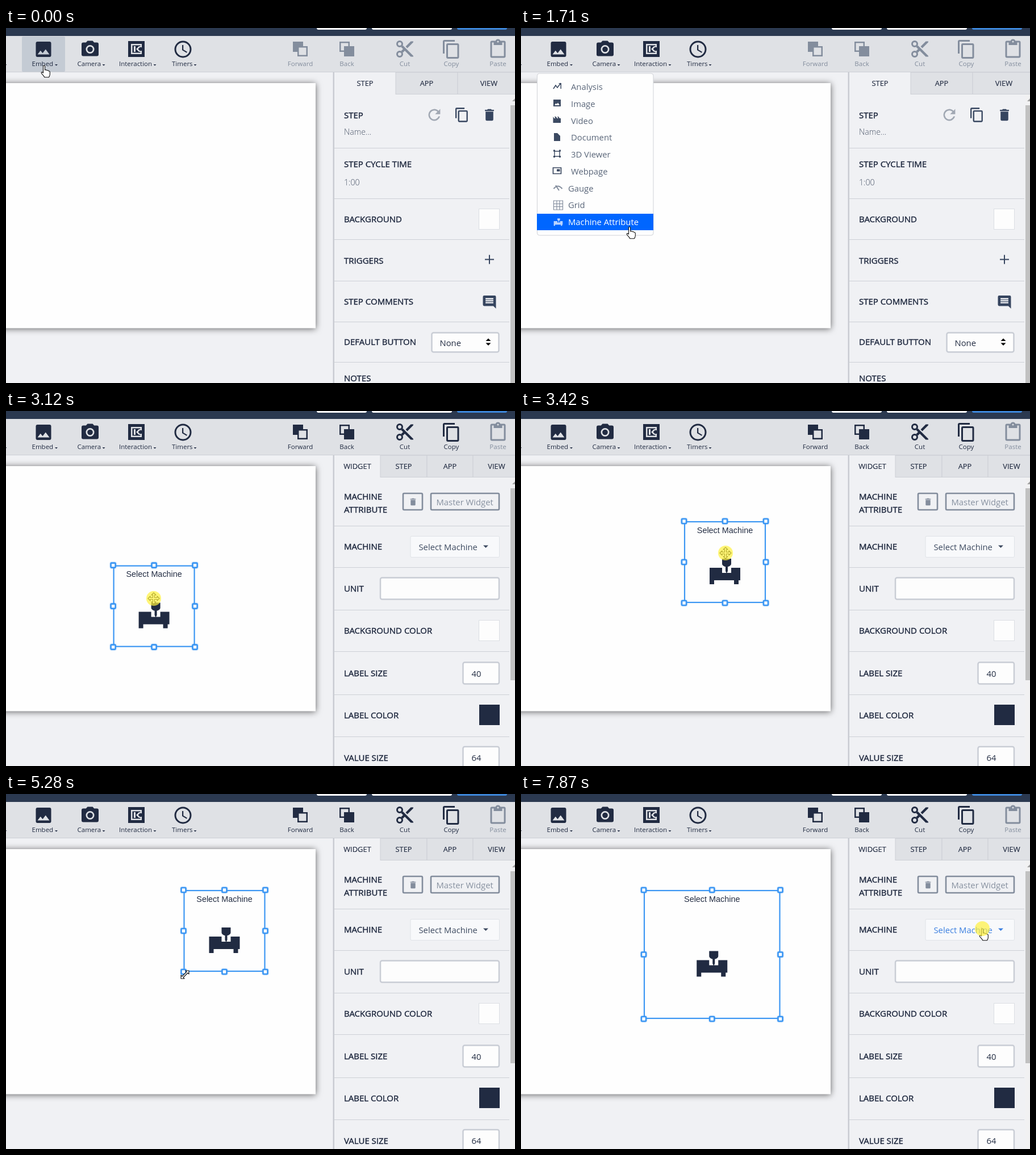
An HTML page that plays this animation: 896 by 625 pixels, repeating every 8000 ms.

```html
<!DOCTYPE html>
<html lang="en">
<head>
<meta charset="utf-8">
<title>App editor</title>
<style>
html, body { margin: 0; width: 100%; height: 100%; overflow: hidden; background: #f0f1f4; }
svg { display: block; font: 14.8px "Open Sans", "Noto Sans", sans-serif; }
text { fill: #232d43; white-space: pre; }
.title { font-size: 15px; fill: #1d273d; stroke: #1d273d; stroke-width: .4; }
.tab { font-size: 12.9px; text-anchor: middle; stroke: #232d43; stroke-width: .15; }
.tool { font-size: 11.5px; }
.mid { text-anchor: middle; }
.thin { font-weight: 300; font-size: 14.2px; fill: #4a5568; }
.soft { fill: #8791a0; }
.menu text { fill: #5b677a; }
.arial { font: 14.4px "Liberation Sans", Arial, sans-serif; text-anchor: middle; }
.field { fill: #fdfdfd; stroke: #c9cdd5; stroke-width: 2.5; }
.line { fill: none; stroke: currentColor; stroke-width: 3; }
.icon { fill: currentColor; color: #212b42; }
.icon text { fill: currentColor; }
.off { color: #838d9d; }
.cursor { fill: #fff; stroke: #111; stroke-width: 1.1; stroke-linejoin: round; }
</style>
</head>
<body>
<script>
const W = 896, H = 625, LOOP = 8000, TICK = 77.7;
const TOOLBAR = '#dfe1e5', NAVY = '#212b42', BLUE = '#3b96f3', RULE = '#cdd0d6';

const rect = (x, y, w, h, fill, more = '') =>
  `<rect x="${x}" y="${y}" width="${w}" height="${h}" fill="${fill}" ${more}/>`;
const box = (x, y, w, h) => `<rect class="field" x="${x}" y="${y}" width="${w}" height="${h}" rx="3"/>`;
const text = (x, y, s, cls = '') => `<text x="${x}" y="${y}" class="${cls}">${s}</text>`;
const path = (d, more = '') => `<path d="${d}" ${more}/>`;
const line = (d, width = 3) => path(d, `class="line" style="stroke-width:${width}"`);
const group = (id, body, more = '') => `<g id="${id}" ${more}>${body}</g>`;
const caret = (x, y, r = 2.5) => path(`M${x - r} ${y}h${2 * r}l${-r} ${r}z`);
const titles = list => list.map(([y, s]) => text(595, y + 5, s, 'title')).join('');
const rules = ys => ys.map(y => rect(578, y, 308, 1, RULE)).join('');
const swatch = (y, fill) => rect(832.5, y, 36, 36, fill, 'stroke="#dcdfe4"');

// Icons on a 24 by 24 grid.
const glyphs = {
  photo: path('M5 3h14q2 0 2 2v14q0 2-2 2h-14q-2 0-2-2v-14q0-2 2-2zM5 18h14l-4.500-6-3.500 4.500-2.500-3z', 'fill-rule="evenodd"'),
  camera: path('M9 2h6l1.830 2h3.170q2 0 2 2v12q0 2-2 2h-16q-2 0-2-2v-12q0-2 2-2h3.170zM12 7a5 5 0 1 0 0 10a5 5 0 1 0 0-10z', 'fill-rule="evenodd"')
    + '<circle cx="12" cy="12" r="3.200"/>',
  clock: '<circle cx="12" cy="12" r="9" class="line" style="stroke-width:2"/>' + path('M11 7h1.500v5.250l4.500 2.670-.75 1.230-5.250-3.150z'),
  cut: '<g class="line" style="stroke-width:2"><circle cx="6" cy="6" r="3"/><circle cx="6" cy="18" r="3"/></g>'
    + path('M9.640 7.640L22 20v1h-3l-7-7-2.360 2.360-2-2L10 12 7.640 9.640zM19 3l-6 6 2 2 7-7v-1z'),
  copy: path('M16 1h-12q-2 0-2 2v14h2v-14h12zM8 5h11q2 0 2 2v14q0 2-2 2h-11q-2 0-2-2v-14q0-2 2-2zM8 7v14h11v-14z', 'fill-rule="evenodd"'),
  paste: path('M9.180 2a3 3 0 0 1 5.640 0h4.180q2 0 2 2v16q0 2-2 2h-14q-2 0-2-2v-16q0-2 2-2zM5 4v16h14v-16h-2v3h-10v-3zM12 2a1 1 0 1 0 0 2a1 1 0 1 0 0-2z', 'fill-rule="evenodd"'),
  refresh: path('M17.650 6.350A8 8 0 1 0 19.730 14h-2.080A6 6 0 1 1 16.220 7.780L13 11h7v-7z'),
  trash: path('M6 7h12v12q0 2-2 2h-8q-2 0-2-2zM5 4h3.500l1-1h5l1 1h3.500v2h-14z'),
  comment: path('M4 2h16q2 0 2 2v18l-4-4h-14q-2 0-2-2v-12q0-2 2-2zM6 6v2h12v-2zM6 9v2h12v-2zM6 12v2h12v-2z', 'fill-rule="evenodd"'),
};
const glyph = (name, x, y, k = 1.5) =>
  `<g transform="translate(${x} ${y}) scale(${k}) translate(-12 -12)">${glyphs[name]}</g>`;

// Each tab is its left edge and its name; the first one is active.
const tabs = list => list.map(([x, name], i) => {
  const end = i + 1 < list.length ? list[i + 1][0] : 905;
  const back = i ? rect(x, 78, end - x, 38.5, TOOLBAR, `stroke="${RULE}"`) : '';
  return back + text((x + end) / 2, 101.5, name, 'tab');
}).join('');

const toolbar = () => rect(0, 0, W, 14, '#2b3950')
  + rect(547, -6, 88, 9, '#fdfdfd', 'rx="3"') + rect(644, -6, 141, 9, '#fdfdfd', 'rx="3"')
  + rect(794, -6, 88, 9, '#3d86d8', 'rx="3"')
  + rect(0, 14, W, 63, TOOLBAR) + rect(0, 77, W, 1, RULE)
  + group('embedHover', rect(28, 15, 76, 62, '#c4cbd4', 'rx="2"'))
  + `<g class="icon">${
    glyph('photo', 66, 37.5) + glyph('camera', 148, 37.5) + glyph('clock', 311.5, 37.5)
  + rect(215, 23, 29, 28, NAVY)
  + path('M220 28h19v6h-2.500v-3.500h-14v13h14v-3.500h2.500v6h-19zM225 32h3v10h-3zM229 37l5-5h3.500l-5 5 5 5h-3.500z', `fill="${TOOLBAR}"`)
  + [[45.5, 'Embed', 88.5], [125.5, 'Camera', 172], [199, 'Interaction', 262], [292, 'Timers', 333]]
      .map(([x, s, c]) => text(x, 67, s, 'tool') + caret(c, 64)).join('') + caret(-1, 64)
  }</g>`
  + group('edit',
      rect(505, 24, 18, 18, 'currentColor') + rect(514.25, 33.25, 15.5, 15.5, TOOLBAR, 'stroke="currentColor" stroke-width="2.500"')
    + rect(588.25, 25.25, 15.5, 15.5, TOOLBAR, 'stroke="currentColor" stroke-width="2.500"') + rect(595, 32, 18, 18, 'currentColor')
    + glyph('cut', 702, 37) + glyph('copy', 784, 37.5)
    + [[518, 'Forward'], [600, 'Back'], [702, 'Cut'], [784, 'Copy']]
        .map(([x, s]) => text(x, 67, s, 'tool mid')).join(''), 'class="icon"')
  + `<g class="icon off">${glyph('paste', 866, 37.5)}${text(866, 67, 'Paste', 'tool mid')}</g>`;

const stepPanel = () => tabs([[578, 'STEP'], [686, 'APP'], [795, 'VIEW']])
  + rules([211, 300, 372, 445, 517, 588])
  + titles([[153.5, 'STEP'], [240, 'STEP CYCLE TIME'], [337, 'BACKGROUND'], [410, 'TRIGGERS'],
      [482, 'STEP COMMENTS'], [553, 'DEFAULT BUTTON'], [616.5, 'NOTES']])
  + text(595, 188, 'Name...', 'thin') + text(595, 277, '1:00', 'thin')
  + `<g class="icon" style="color:#a1a8b3">${glyph('refresh', 754, 153, 1.3)}</g>`
  + `<g class="icon" style="color:#36455f">${glyph('copy', 802.5, 153, 1.15)}${glyph('trash', 851, 153, 1.13)}`
  + line('M843 407.500h16M851 399.500v16', 2) + glyph('comment', 851, 482.5, 1.15) + '</g>'
  + swatch(318.5, '#fdfdfd') + box(749.5, 536.5, 118, 34) + text(763.5, 559.5, 'None')
  + path('M844.500 551l4.500-4.500 4.500 4.500zM844.500 554.500l4.500 4.500 4.500-4.500z');

const widgetPanel = () => tabs([[578, 'WIDGET'], [659, 'STEP'], [741, 'APP'], [822, 'VIEW']])
  + rules([202, 275, 350, 423, 499, 573])
  + titles([[151, 'MACHINE'], [174, 'ATTRIBUTE'], [238.5, 'MACHINE'], [313, 'UNIT'], [386.5, 'BACKGROUND COLOR'],
      [461.5, 'LABEL SIZE'], [536, 'LABEL COLOR'], [610.5, 'VALUE SIZE']])
  + `<g class="icon off">${[[699, 34], [748, 120]].map(([x, w]) =>
      rect(x, 145, w, 29, 'none', 'rx="2" stroke="currentColor" stroke-width="2.600"')).join('')}`
  + glyph('trash', 716.5, 160, .7) + '</g>' + text(757.5, 165.5, 'Master Widget', 'soft')
  + rect(712, 220.5, 156.5, 37, '#f8f9fb', 'rx="2" stroke="#dfe2e7"')
  + group('select', text(726.5, 244.5, 'Select Machine') + caret(844.5, 236.5, 4.5))
  + box(659, 293.5, 209, 38) + swatch(368.5, '#fdfdfd')
  + box(804.5, 442.5, 63.5, 38) + text(819.5, 468, '40')
  + rect(833, 517, 36, 36, NAVY) + box(804.5, 591, 63.5, 45) + text(819.5, 616, '64');

const menuIcons = [
  line('M57 107l4-6 3 4 6-8', 1.6) + path('M66 97h5v10h-1.500v-7z'),
  path('M57 126h13v12h-13zM59 136h9l-3-4.500-2 2.500-1.500-1.500z', 'fill-rule="evenodd"'),
  path('M56.500 156l2 3h2l-1.500-3h2.500l2 3h2l-1.500-3h2l2 3h2v8h-13.500z'),
  path('M58 185h6l5 5v9h-11z'),
  line('M59 217v9h9v-9z', 1.4) + path('M57 214.500h3v3h-3zM67 214.500h3v3h-3zM57 225h3v3h-3zM67 225h3v3h-3z'),
  line('M56.500 246h14v10.500h-14z', 1.7) + path('M63 248.500h5.500v4h-5.500z'),
  line('M57.500 283q7.500-9 15 0M61 277l6 9', 2),
  line('M57.500 304h16v16h-16zM63 304v16M68 304v16M57.500 309.500h16M57.500 314.500h16', 1.2),
];
const menuNames = ['Analysis', 'Image', 'Video', 'Document', '3D Viewer', 'Webpage', 'Gauge', 'Grid', 'Machine Attribute'];
const machine = 'M-27 10h22v9h16v-9h16v22h-3v7h-8v-7h-35v7h-8v-7zM-5-6h16v9q0 3-5 5h-1v8l-2 4-2-4v-8h-1q-5-2-5-5z';

const menu = () => rect(28.5, 80, 204.500, 285, '#fefefe', 'rx="4" stroke="#cfd2d7"')
  + group('choice', rect(28, 327, 205, 29, '#06f'))
  + menuNames.map((name, i) => text(i < 6 ? 88 : 83, 109.3 + i * 29.7, name, i === 8 ? 'last' : '')).join('')
  + `<g class="icon" style="color:#3c4a62">${menuIcons.slice(0, 6).join('')}</g>`
  + `<g class="icon off">${menuIcons.slice(6).join('')}</g>`
  + path(machine, 'id="menuMachine" transform="translate(65.500 337) scale(.29)"');

const cursors = {
  arrow: 'M0 0v14.500l3.400-3.200 2.300 5.200 2.600-1.100-2.300-5h4.700z',
  hand: 'M-1.500 1q1.500-2 3 0v7q3-1 3.500.8 2.500-.8 3 1 2.500-.3 2.300 2.500v3.500q-.3 3-2 5h-7.500q-1-2.500-5-6.500-1.500-2.500.500-2.800l2.200 1.500z',
  move: 'M0-10l4 4h-2.500v4.500h4.500v-2.500l4 4-4 4v-2.500h-4.500v4.500h2.500l-4 4-4-4h2.500v-4.500h-4.500v2.500l-4-4 4-4v2.500h4.500v-4.500h-2.500z',
  resize: 'M7-7v6l-2-2-8 8 2 2h-6v-6l2 2 8-8-2-2z',
};

document.body.innerHTML = `<svg width="${W}" height="${H}" viewBox="0 0 ${W} ${H}">`
  + rect(-20, 97, 565, 431.5, '#fefefe', 'style="filter:drop-shadow(0 1px 6px #0009)"')
  + toolbar()
  + rect(575.5, 78, 2.5, 547, '#c9ccd2')
  + group('stepPanel', stepPanel()) + group('widgetPanel', widgetPanel())
  + rect(888, 117, 8, 508, '#f1f1f2') + path('M891 129l5-5v5z', 'fill="#a0a0a0"')
  + rect(888, 136, 8, 489, '#c1c1c1', 'id="thumb"')
  + group('menu', menu(), 'class="menu"') + group('widget', '')
  + group('cursor', Object.entries(cursors).map(([id, d]) => path(d, `id="${id}" class="cursor"`)).join('')
    + '<circle id="press" r="13" fill="#fff13d" opacity=".7"/>')
  + '</svg>';

const $ = id => document.getElementById(id);
const show = (id, on) => { $(id).style.display = on ? '' : 'none'; };
const within = (k, ...spans) => spans.some(([a, b]) => k >= a && k < b);

// Keys are [tick, x, y], joined by straight lines.
const pointer = [[5, 67, 66], [10, 150, 250], [13, 205, 366], [15, 191, 350], [29, 191, 350], [31, 235, 350],
  [37, 235, 350], [42, 360, 250], [46, 384, 229], [56, 384, 229], [60, 480, 275], [63, 430, 312], [66, 315, 318],
  [69, 315, 318], [72, 255, 369], [75, 218, 401], [88, 218, 401], [91, 889, 270], [92, 852, 239], [93, 852, 239], [97, 812, 237]];
const drag = [[37, 164, 291], [42, 287, 194], [46, 312.5, 169]];

function at(keys, k) {
  const i = keys.findIndex(key => key[0] > k);
  if (i < 1) return (i ? keys[keys.length - 1] : keys[0]).slice(1);
  const [a, b] = [keys[i - 1], keys[i]], p = (k - a[0]) / (b[0] - a[0]);
  return [1, 2].map(n => a[n] + (b[n] - a[n]) * p);
}

function widget(x, y, r, b) {
  const cx = (x + r) / 2, cy = (y + b) / 2;
  const handles = [x, cx, r].flatMap(hx => [y, cy, b].map(hy => [hx, hy]))
    .filter(([hx, hy]) => hx !== cx || hy !== cy);
  return rect(x + 1, y + 1, r - x - 2, b - y - 2, '#fefefe', `stroke="${BLUE}" stroke-width="2.200"`)
    + text(cx, y + 20.5, 'Select Machine', 'arial')
    + path(machine, `fill="${NAVY}" transform="translate(${cx} ${cy})"`)
    + handles.map(([hx, hy]) => rect(hx - 4, hy - 4, 8, 8, '#fff',
        `rx="1" stroke="${BLUE}" stroke-width="2.600" style="filter:drop-shadow(0 0 1px #3b96f399)"`)).join('');
}

let shown;
function draw(now) {
  requestAnimationFrame(draw);
  const k = Math.floor((now % LOOP - 150) / TICK);
  if (k === shown) return;
  shown = k;

  const placed = k >= 23, chosen = k >= 17;
  show('embedHover', !chosen);
  show('menu', within(k, [3, 23]));
  show('choice', chosen);
  document.querySelector('.last').style.fill = chosen ? '#fff' : '';
  $('menuMachine').style.fill = chosen ? '#b9d4ff' : '#838d9d';
  show('stepPanel', !placed);
  show('widgetPanel', placed);
  show('widget', placed);
  $('edit').setAttribute('class', placed ? 'icon' : 'icon off');
  $('thumb').setAttribute('height', placed ? 338 : 489);

  const [x, y] = at(pointer, k);
  $('thumb').style.fill = x > 886 ? '#a8a8a8' : '';
  for (const node of $('select').children) node.style.fill = k >= 94 ? '#3b7fe0' : '#3d4a60';

  const [left, top] = at(drag, k);
  const [cornerX, cornerY] = k < 70 ? [left, top + 144] : at(pointer, Math.min(k, 75)).map((v, i) => v - [2, 5][i]);
  $('widget').innerHTML = widget(cornerX, top, left + 144, cornerY);

  $('cursor').setAttribute('transform', `translate(${x} ${y})`);
  show('hand', within(k, [-9, 23], [94, 999]));
  show('arrow', within(k, [23, 33], [57, 66], [89, 94]));
  show('move', within(k, [36, 46]));
  show('resize', within(k, [66, 89]));
  show('press', within(k, [0, 3], [17, 20], [36, 46], [70, 86], [99, 999]));
}
requestAnimationFrame(draw);
</script>
</body>
</html>
```
